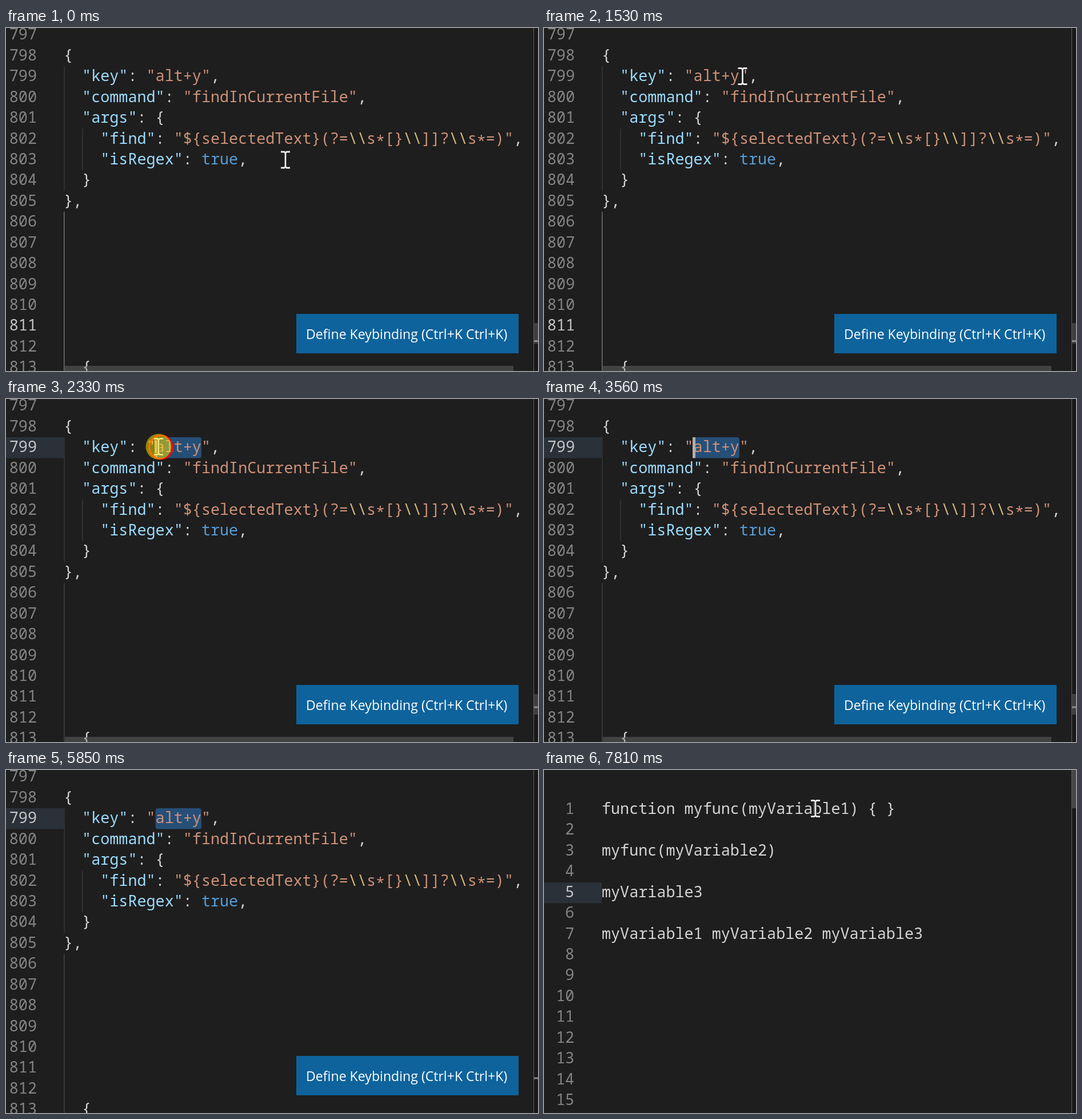
Animation of 931 by 601 pixels, one loop 8000 ms. Source, as an HTML page:

```html
<!DOCTYPE html>
<html lang="en">
<head>
<meta charset="utf-8">
<title>Editor</title>
<style>
  html, body { margin: 0; width: 100%; height: 100%; overflow: hidden; background: #1e1e1e; }
  svg { display: block; width: 931px; height: 601px; }
  text { white-space: pre; font: 26.77px "Noto Sans Mono", monospace; }
  .num { text-anchor: end; }
  .label { font: 23.1px "Open Sans", sans-serif; }
</style>
</head>
<body>
<svg id="stage" viewBox="0 0 931 601"></svg>
<script>
const LOOP = 8000, CELL = 16.062, LINE = 36.43, LEFT = 101;
const PLAIN = '#d4d4d4', KEY = '#9cdcfe', STR = '#ce9178', ESC = '#d7ba7d', BOOL = '#569cd6';
const DIM = '#858585', LIT = '#c6c6c6', GUIDE = '#404040';
const stage = document.getElementById('stage');

function add(parent, tag, attrs, text) {
  const el = document.createElementNS('http://www.w3.org/2000/svg', tag);
  for (const k in attrs) el.setAttribute(k, attrs[k]);
  if (text !== undefined) el.textContent = text;
  parent.append(el);
  return el;
}
const rect = (parent, x, y, width, height, fill, more) =>
  add(parent, 'rect', { x, y, width, height, fill, ...more });
const show = (el, on) => el.setAttribute('opacity', +on);

// One line of coloured runs; asterisks sit lower, at mid height.
function code(parent, col, y, runs) {
  const line = add(parent, 'text', { x: LEFT + col * CELL, y });
  let shift = 0;
  for (const [text, fill] of runs)
    for (const part of text.split(/(\*)/).filter(Boolean)) {
      const want = part === '*' ? 5 : 0;
      add(line, 'tspan', { fill, dy: want - shift }, part);
      shift = want;
    }
}

function numbers(parent, first, count, baseline, right) {
  const all = {};
  for (let i = 0; i < count; i++)
    all[first + i] = add(parent, 'text', { x: right, y: baseline + i * LINE, class: 'num', fill: DIM }, first + i);
  return all;
}

rect(stage, 0, 0, 931, 601, '#1e1e1e');
rect(stage, 925, 0, 6, 601, '#191919');
rect(stage, 923, 0, 1, 601, '#5c5c5c');

// Settings file
const settings = add(stage, 'g', {});
const rowA = n => 93.3 + (n - 799) * LINE;
const activeA = rect(settings, 0, 67, 101, 36.5, '#2a3138');
const pick = rect(settings, 261, 67, 81, 36.5, '#264f78', { rx: 4 });
rect(settings, 101.5, 67, 1, 218.5, GUIDE);
rect(settings, 133.5, 176.5, 1, 72.5, GUIDE);
const longGuide = rect(settings, 101, 322, 1.5, 279, GUIDE);
const numsA = numbers(settings, 797, 17, rowA(797), 54);
const pair = (key, rest) => [[`"${key}"`, KEY], [': ', PLAIN], ...rest];
[
  [798, 0, [['{', PLAIN]]],
  [799, 2, pair('key', [['"alt+y"', STR], [',', PLAIN]])],
  [800, 2, pair('command', [['"findInCurrentFile"', STR], [',', PLAIN]])],
  [801, 2, pair('args', [['{', PLAIN]])],
  [802, 4, pair('find', [
    ['"${selectedText}(?=', STR], ['\\\\', ESC], ['s*[}', STR], ['\\\\', ESC],
    [']]?', STR], ['\\\\', ESC], ['s*=)"', STR], [',', PLAIN]])],
  [803, 4, pair('isRegex', [['true', BOOL], [',', PLAIN]])],
  [804, 2, [['}', PLAIN]]],
  [805, 0, [['},', PLAIN]]],
  [813, 2, [['{', PLAIN]]]
].forEach(([n, col, runs]) => code(settings, col, rowA(n), runs));
const caretA = rect(settings, 260, 67, 5, 36.5, '#aeafad');
const bars = add(settings, 'g', {});
rect(bars, 103, 592, 785, 9, '#797979', { 'fill-opacity': .4 });
rect(bars, 924, 517, 7, 36, '#797979', { 'fill-opacity': .4 });
const mark = rect(settings, 924, 538.5, 7, 3, '#8c8c8c');
rect(settings, 508, 501, 389, 69, '#0e639c');
add(settings, 'text', { x: 525, y: 545, class: 'label', fill: '#fff' }, 'Define Keybinding (Ctrl+K Ctrl+K)');

// Script file
const script = add(stage, 'g', {});
const rowB = n => 77 + (n - 1) * LINE;
const activeB = rect(script, 0, 197, 101, 36.3, '#2a3138');
numbers(script, 1, 15, rowB(1), 53)[5].setAttribute('fill', LIT);
[
  [1, 'function myfunc(myVariable1) { }'],
  [3, 'myfunc(myVariable2)'],
  [5, 'myVariable3'],
  [7, 'myVariable1 myVariable2 myVariable3']
].forEach(([n, text]) => code(script, 0, rowB(n), [[text, PLAIN]]));
const caretB = rect(script, 196, 197, 5, 36.3, '#aeafad');
rect(script, 924, 0, 7, 1, '#8c8c8c');
const sliderB = rect(script, 924, 0, 7, 67, '#464646');

// Pointer: ring and disc appear while the button is held
const ring = add(stage, 'circle', { r: 20.5, fill: 'none', stroke: '#f00', 'stroke-width': 3 });
const beam = add(stage, 'g', {});
const beamPath = 'M-8-14H-2L0-12L2-14H8M0-12V12M-8 14H-2L0 12L2 14H8';
add(beam, 'path', { d: beamPath, fill: 'none', stroke: '#111', 'stroke-width': 4.5 });
add(beam, 'path', { d: beamPath, fill: 'none', stroke: '#ececec', 'stroke-width': 2.8 });
const disc = add(stage, 'circle', { r: 22.5, fill: '#ffe600', 'fill-opacity': .5 });

// time, x, y
const path = [
  [0, 489, 231], [30, 489, 231], [190, 480, 215], [300, 480, 215],
  [700, 430, 140], [1110, 379, 67], [1150, 379, 67], [1530, 347.5, 84.5],
  [1850, 347.5, 84.5], [2330, 267, 83.5], [2400, 262.5, 83.5], [2590, 262.5, 83.5],
  [2880, 669, 191.5], [3240, 669, 191.5], [3550, 640, -20],
  [7080, 80, -20], [7130, 94, 4], [7470, 478, 69], [7640, 478, 69], [7800, 475, 67.5], [LOOP, 475, 67.5]
];
function pos(t) {
  let i = 1;
  while (i < path.length - 1 && t > path[i][0]) i++;
  const [t0, x0, y0] = path[i - 1], [t1, x1, y1] = path[i];
  const k = Math.min(1, Math.max(0, (t - t0) / (t1 - t0)));
  return [x0 + (x1 - x0) * k, y0 + (y1 - y0) * k];
}
const within = (t, spans) => spans.some(([a, b]) => t >= a && t < b);
const ramp = (t, a, b) => Math.min(1, Math.max(0, (t - a) / (b - a)));
const blinkA = [[1730, 2740], [3280, 3780], [4320, 4860], [5390, 5850]];
const blinkB = [[6320, 6780], [7310, 7810]];

function draw(t) {
  const first = t < 6250, clicked = t >= 1730, held = t >= 1730 && t < 2600;
  const [x, y] = pos(t);
  show(settings, first);
  show(script, !first);

  show(activeA, clicked);
  numsA[799].setAttribute('fill', clicked ? LIT : DIM);
  numsA[811].setAttribute('fill', clicked ? DIM : LIT);
  longGuide.setAttribute('fill', clicked ? GUIDE : '#707070');
  mark.setAttribute('y', clicked ? 538.5 : 547);
  const col = held ? Math.min(15, Math.max(10, Math.round((x - LEFT) / CELL))) : 10;
  const edge = LEFT + col * CELL;
  show(pick, clicked && col < 15);
  pick.setAttribute('x', edge);
  pick.setAttribute('width', (15 - col) * CELL);
  caretA.setAttribute('x', Math.round(edge - 1.6));
  show(caretA, within(t, blinkA));
  show(bars, 1);
  bars.setAttribute('opacity', 1 - ramp(t, 4270, 4460));

  show(activeB, t >= 6320);
  show(caretB, within(t, blinkB));
  sliderB.setAttribute('opacity', ramp(t, 7080, 7250));

  beam.setAttribute('transform', `translate(${x} ${y})`);
  show(beam, t < 3550 || t >= 7080);
  show(disc, held);
  show(ring, held);
  disc.setAttribute('cx', x);
  disc.setAttribute('cy', y);
  const [rx, ry] = pos(t - 25);
  ring.setAttribute('cx', held ? rx : x);
  ring.setAttribute('cy', ry + 1);
}

const start = performance.now();
function tick() {
  draw((performance.now() - start) % LOOP);
  requestAnimationFrame(tick);
}
draw(0);
requestAnimationFrame(tick);
</script>
</body>
</html>
```
